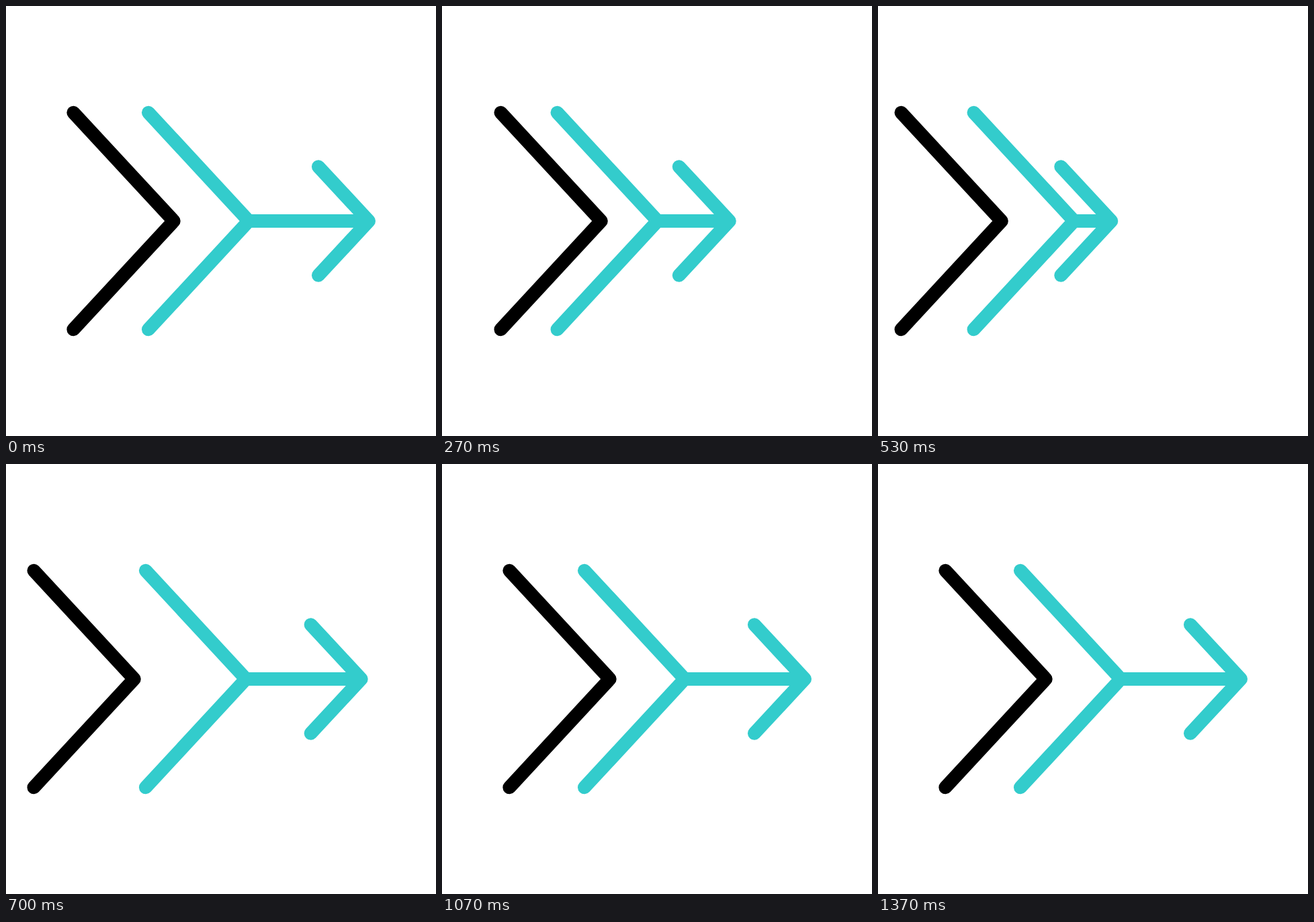
Animation of 640x640 px, one loop 2000 ms. Source, as an HTML page:

```html
<!DOCTYPE html>
<html lang="en">
<head>
<meta charset="utf-8">
<title>Arrow</title>
<style>
  html, body { margin: 0; width: 100%; height: 100%; overflow: hidden; background: #fff; }
  svg { display: block; width: 100%; height: 100%; }
  path { fill: none; stroke-width: 20; stroke-linecap: round; stroke-linejoin: round; }
</style>
</head>
<body>
<svg viewBox="0 0 640 640">
  <path id="tail" stroke="#000"/>
  <path id="arrow" stroke="#33cccc"/>
</svg>
<script>
const LOOP = 2000, RATE = 30, MID = 320;
const tail = document.getElementById('tail');
const arrow = document.getElementById('arrow');

// Keys are [tick, x offset] pairs, 30 ticks per second.
const tailKeys = [[4, 0], [19, -73.5], [26, 0]];
const wingKeys = [[0, 0], [15, -73.5], [22, 0]];
const headKeys = [[0, 0], [15, -204], [22, 0], [28, -114], [32, 0], [37, -57], [41, 0]];

const ease = p => p * p * (3 - 2 * p);

function valueAt(keys, tick) {
  if (tick <= keys[0][0]) return keys[0][1];
  for (let i = 1; i < keys.length; i++) {
    const [t0, a] = keys[i - 1], [t1, b] = keys[i];
    if (tick < t1) return a + (b - a) * ease((tick - t0) / (t1 - t0));
  }
  return keys[keys.length - 1][1];
}

// A right-pointing angle with its tip on the middle line.
const chevron = (tip, w, h) =>
  `M${tip - w} ${MID - h}L${tip} ${MID}L${tip - w} ${MID + h}`;

function draw(ms) {
  // Poses advance in whole ticks.
  const tick = Math.floor((ms % LOOP) * RATE / 1000 + 0.1);
  const tailTip = 249.7 + valueAt(tailKeys, tick);
  const wingTip = 361.3 + valueAt(wingKeys, tick);
  const headTip = 540 + valueAt(headKeys, tick);
  tail.setAttribute('d', chevron(tailTip, 149.3, 161.3));
  arrow.setAttribute('d', chevron(wingTip, 149.3, 161.3) +
    `M${wingTip} ${MID}H${headTip}` + chevron(headTip, 75, 80.8));
}

const start = performance.now();
function loop(now) {
  draw(Math.max(0, now - start));
  requestAnimationFrame(loop);
}
draw(0);
requestAnimationFrame(loop);
</script>
</body>
</html>
```
